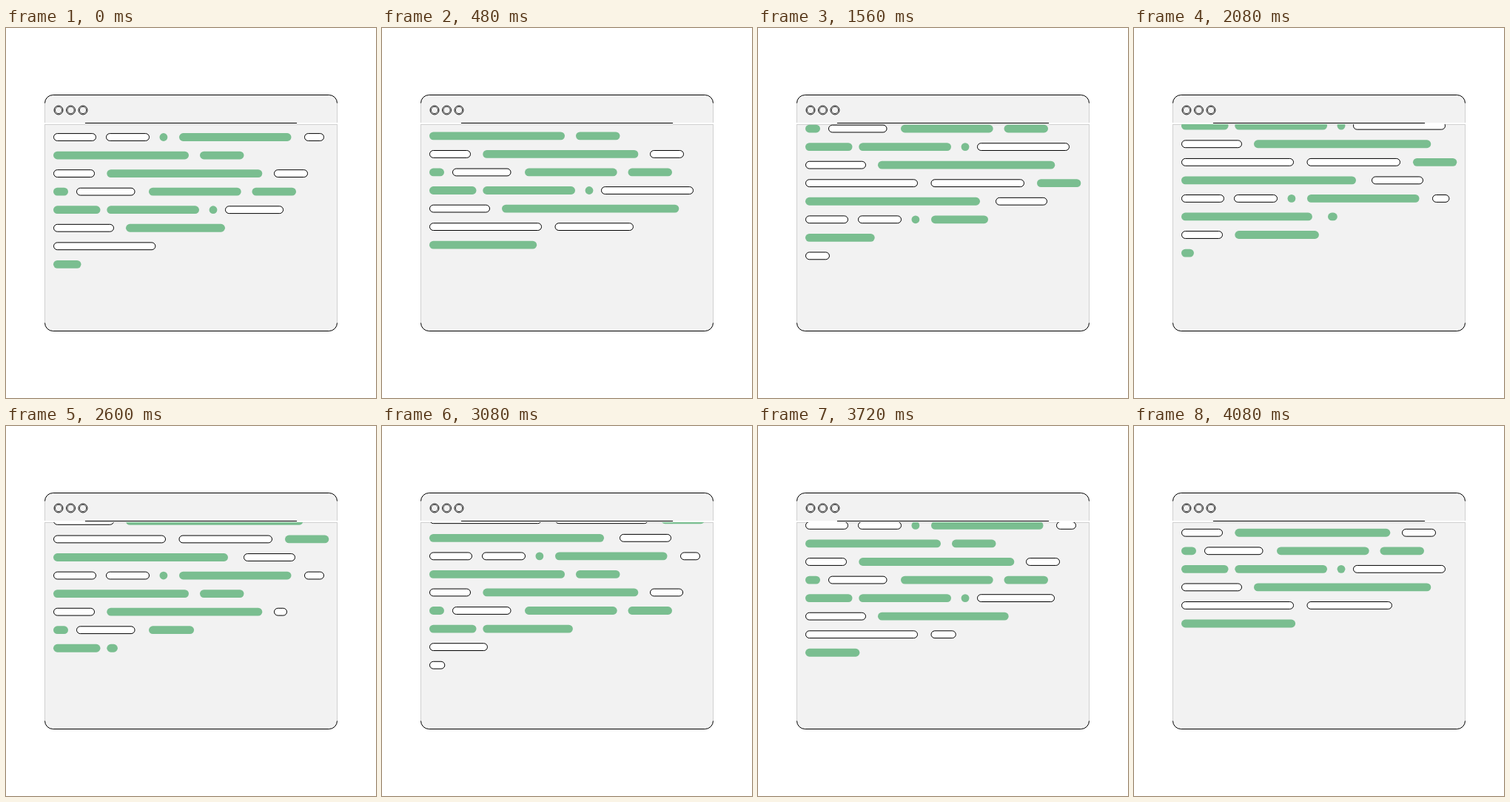
An HTML page that plays this animation: 500x500 px, repeating every 4120 ms.

```html
<!DOCTYPE html>
<html lang="en">
<head>
<meta charset="utf-8">
<title>Scrolling code window</title>
<style>
  html, body { margin: 0; width: 100%; height: 100%; overflow: hidden; background: #fff; }
  svg { display: block; width: 100%; height: 100%; }
  .ink { fill: none; stroke: #000; stroke-width: 1; }
  .edge { fill: none; stroke: #d0d0d0; stroke-width: 1; }
  .green { fill: #7abe90; }
  .white { fill: #fff; stroke: #000; stroke-width: 1; }
</style>
</head>
<body>
<svg viewBox="0 0 500 500">
  <defs>
    <clipPath id="page"><rect x="52" y="130" width="396" height="279"/></clipPath>
    <g id="button" class="ink">
      <circle r="6" stroke-width=".9"/>
      <circle r="4.6" stroke-width=".7"/>
    </g>
  </defs>
  <rect x="52" y="90.5" width="396" height="319" rx="11" fill="#f2f2f2"/>
  <path class="edge" d="M52.5 101.5V398.5M447.5 101.5V398.5"/>
  <path class="ink" d="M52.5 101.5a11 11 0 0 1 11-11H436.5a11 11 0 0 1 11 11M52.5 398.5a11 11 0 0 0 11 11H436.5a11 11 0 0 0 11-11"/>
  <use href="#button" x="71" y="111"/>
  <use href="#button" x="87.5" y="111"/>
  <use href="#button" x="104" y="111"/>
  <path d="M52 129H448" stroke="#fff" stroke-width="2"/>
  <path class="edge" d="M52 130.5H448"/>
  <path class="ink" d="M107 128.5H393"/>
  <g clip-path="url(#page)"><g id="lines"></g></g>
</svg>
<script>
const LOOP = 4120, STEP = 40;
const TYPE_CYCLE = 3560, SCROLL_CYCLE = 3600;
const TOP = 147.5, GAP = 24.55, H = 10.8;
const G = 'green', W = 'white';

// Each line: start time, then pills [colour, x, width, end time, own start time?]
const script = [
  [650, [W, 64, 58, 890], [W, 135, 59, 1120], [G, 207.5, H, 1160], [G, 234, 151.5, 2010], [W, 403, 27, 2100]],
  [1042, [G, 64, 183, 2118], [G, 262, 59.5, 2400, 2066]],
  [1462, [W, 64, 56, 1662], [G, 136.3, 210, 2472], [W, 362, 46, 3096]],
  [2050, [G, 64, 20, 2095], [W, 95, 79.5, 2385], [G, 193, 124.7, 2872], [G, 332.5, 59.5, 3080]],
  [2350, [G, 64, 63.5, 3094 - 511], [G, 136.3, 124.7, 3094], [G, 274.6, H, 3139], [W, 296, 125, 3843]],
  [2680, [W, 64, 82, 3098], [G, 162, 239.3, 3955]],
  [3037, [W, 64, 152, 3616], [W, 233.5, 126.5, 4129], [G, 377, 59.3, 4400]],
  [3441, [G, 64, 236, 4445], [W, 321, 70, 4873]]
];

const lines = document.getElementById('lines');
const add = (parent, tag) =>
  parent.appendChild(document.createElementNS('http://www.w3.org/2000/svg', tag));

const pills = [];
for (let k = 0; k < script.length * 2; k++) {
  const shift = k < script.length ? -TYPE_CYCLE : 0;
  let [start, ...row] = script[k % script.length];
  for (const [colour, x, w, end, own] of row) {
    const el = add(lines, 'rect');
    const inset = colour === W ? 0.5 : 0;
    el.setAttribute('class', colour);
    el.setAttribute('x', x + inset);
    el.setAttribute('y', TOP + GAP * k - H / 2 + inset);
    el.setAttribute('height', H - 2 * inset);
    el.setAttribute('rx', H / 2 - inset);
    pills.push({ el, w, inset, from: (own || start) + shift, to: end + shift });
    start = end;
  }
}

// Scrolling doubles its speed once the first pass is over.
function scrollAt(t) {
  const speed = GAP * script.length / SCROLL_CYCLE;
  return speed * (t + Math.max(0, t - SCROLL_CYCLE));
}

function draw(t) {
  lines.setAttribute('transform', `translate(0 ${-scrollAt(t)})`);
  for (const { el, w, inset, from, to } of pills) {
    const p = Math.min(1, (t - from) / (to - from));
    el.setAttribute('visibility', p < 0 ? 'hidden' : 'visible');
    el.setAttribute('width', H + (w - H) * Math.max(0, p) - 2 * inset);
  }
}

const began = performance.now();
function tick() {
  const t = (performance.now() - began) % LOOP;
  draw(Math.floor(t / STEP) * STEP);
  requestAnimationFrame(tick);
}
tick();
</script>
</body>
</html>
```
